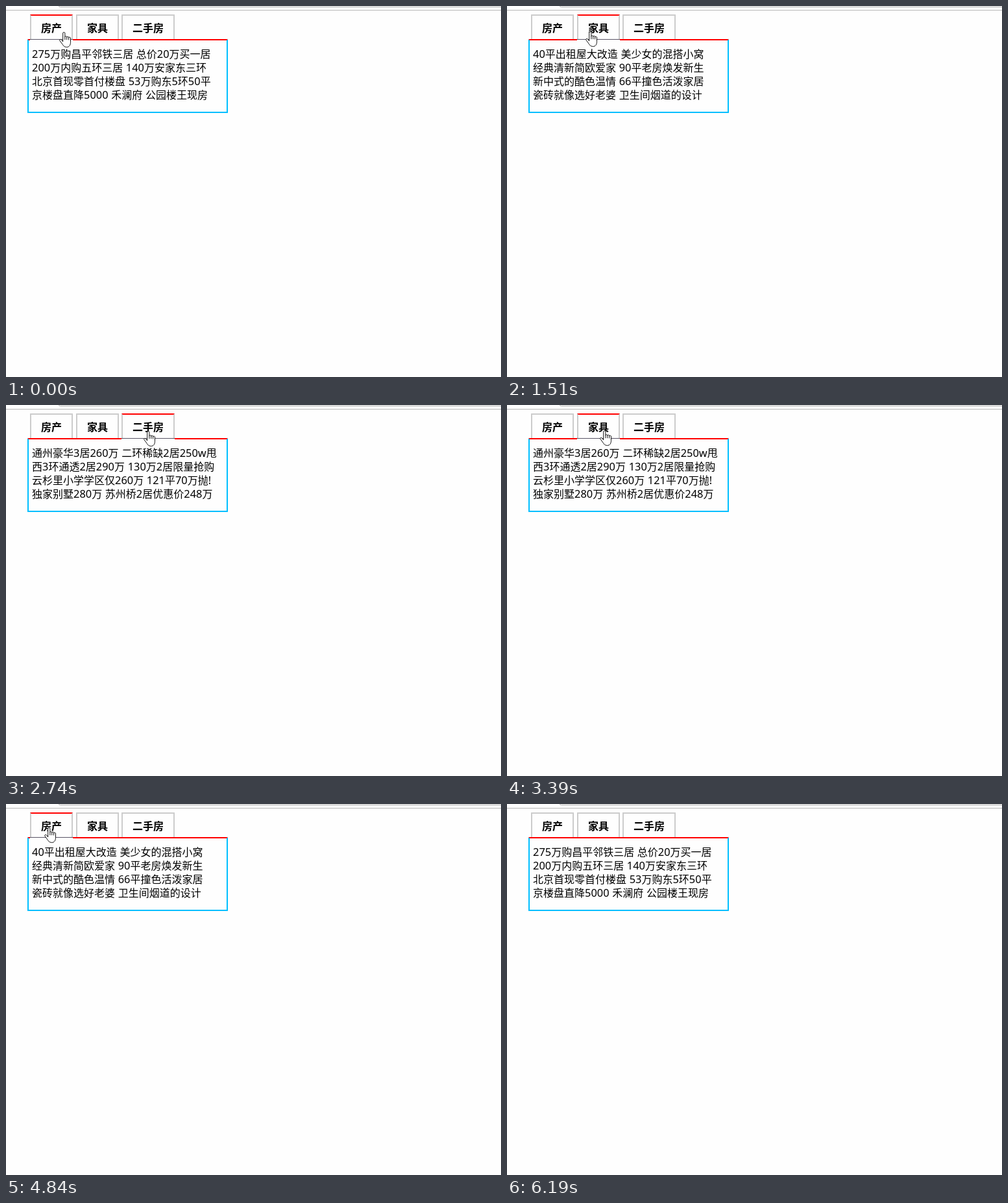
An HTML page that plays this animation: 763 px wide and 572 px high, repeating every 6740 ms.

```html
<!DOCTYPE html>
<html lang="zh-CN">
<head>
<meta charset="utf-8">
<title>Tabs</title>
<style>
html, body { margin: 0; width: 100%; height: 100%; overflow: hidden; background: #fefefe; }
svg { display: block; width: 763px; height: 572px; }
text { font: 16px "Noto Sans CJK SC", "Noto Sans CJK", sans-serif; white-space: pre; word-spacing: .4px; fill: #000; }
tspan.latin { font-family: "Noto Sans", "Open Sans", sans-serif; font-size: 16.4px; }
.tab text { font-weight: 700; }

.timed { opacity: 0; animation: 6740ms step-end infinite; }
#hot0 { animation-name: hot0; }
#hot1 { animation-name: hot1; }
#hot2 { animation-name: hot2; }
#list0 { animation-name: list0; }
#list1 { animation-name: list1; }
#list2 { animation-name: list2; }
#hand { animation-name: hand; }
#beam { animation-name: beam; }
#arrow { animation-name: arrow; }

@keyframes hot0 {
  0%, 70.03%, 100% { opacity: 1; }
  14.39%, 84.12% { opacity: 0; }
}
@keyframes hot1 {
  0%, 32.64%, 66.02%, 100% { opacity: 0; }
  14.39%, 48.36% { opacity: 1; }
}
@keyframes hot2 {
  0%, 48.36%, 100% { opacity: 0; }
  32.64% { opacity: 1; }
}
@keyframes list0 {
  0%, 79.82%, 100% { opacity: 1; }
  22.4% { opacity: 0; }
}
@keyframes list1 {
  0%, 40.65%, 79.82%, 100% { opacity: 0; }
  22.4%, 58.16% { opacity: 1; }
}
@keyframes list2 {
  0%, 58.16%, 100% { opacity: 0; }
  40.65% { opacity: 1; }
}
@keyframes hand {
  0%, 100% { opacity: 1; transform: translate(82px, 40px); }
  11.86% { opacity: 1; transform: translate(85px, 40px); }
  14.39% { opacity: 1; transform: translate(121px, 39px); }
  30.56% { opacity: 1; transform: translate(171px, 32px); }
  32.64% { opacity: 1; transform: translate(200px, 36px); }
  34.56% { opacity: 1; transform: translate(212px, 40px); }
  46.43% { opacity: 1; transform: translate(194px, 39px); }
  48.36% { opacity: 1; transform: translate(160px, 39px); }
  50.29% { opacity: 1; transform: translate(143px, 39px); }
  64.09% { opacity: 1; transform: translate(125px, 38px); }
  66.02% { opacity: 0; transform: translate(105px, 36px); }
  70.03% { opacity: 1; transform: translate(76px, 36px); }
  71.81% { opacity: 1; transform: translate(59px, 36px); }
  81.75% { opacity: 1; transform: translate(64px, 39px); }
  84.12% { opacity: 0; transform: translate(64px, 39px); }
}
@keyframes beam {
  0%, 70.03%, 100% { opacity: 0; transform: translate(105px, 34px); }
  66.02% { opacity: 1; transform: translate(105px, 34px); }
}
@keyframes arrow {
  0%, 91.83%, 100% { opacity: 0; transform: translate(748px, 548px); }
  84.12% { opacity: 1; transform: translate(122px, 84px); }
  86.05% { opacity: 1; transform: translate(300px, 222px); }
  87.98% { opacity: 1; transform: translate(528px, 394px); }
  89.91% { opacity: 1; transform: translate(748px, 548px); }
}
</style>
</head>
<body>
<svg id="stage" viewBox="0 0 763 572" xmlns="http://www.w3.org/2000/svg">
  <path d="M81.5 0Q81.5 1.5 83.5 1.5H763" fill="none" stroke="#aaa"/>
  <rect y="6" width="763" height="1" fill="#b8b8b8"/>

  <path d="M34 52V164H341V52" fill="none" stroke="#00bfff" stroke-width="2"/>
  <path d="M33 51H342L340 53H35Z" fill="#f00"/>
  <g id="tabs"></g>
  <g id="lists"></g>

  <g id="beam" class="timed">
    <path d="M.5 .5H2.5L3.5 1.5L4.5 .5H6.5M3.5 1.5V14.5M.5 15.5H2.5L3.5 14.5L4.5 15.5H6.5" fill="none" stroke="#000"/>
  </g>
  <g id="arrow" class="timed">
    <path d="M.5 .5V16.5L4.2 13L6.7 18.6L9 17.6L6.6 12.1H11.6Z" fill="#fff" stroke="#000"/>
  </g>
  <g id="hand" class="timed" stroke="#111" stroke-linecap="round" stroke-linejoin="round">
    <path fill="#fff" d="M5.7 14.5V2.1a1.6 1.6 0 0 1 3.2 0V7.6a1.5 1.5 0 0 1 2.9 .6a1.5 1.5 0 0 1 2.9 .9a1.4 1.4 0 0 1 2.8 1V15.5C17.5 20.5 15.4 23.4 11.6 23.4C7.8 23.4 6.7 21.5 5.3 19.4L.9 13.4C.1 12 1.6 10.6 3.1 11.7Z"/>
    <path fill="none" d="M8.9 7.6V11.8M11.8 8.4V11.8M14.7 9.4V12"/>
  </g>
</svg>
<script>
const NS = "http://www.w3.org/2000/svg";

function add(parent, tag, attrs = {}) {
  const el = document.createElementNS(NS, tag);
  for (const key in attrs) el.setAttribute(key, attrs[key]);
  return parent.appendChild(el);
}

// Latin runs get their own face beside the Chinese glyphs.
function addText(parent, x, y, str) {
  const line = add(parent, "text", { x, y });
  for (const run of str.match(/[\x20-\x7e]+|[^\x20-\x7e]+/g)) {
    const span = add(line, "tspan");
    if (run.charCodeAt(0) < 127) span.setAttribute("class", "latin");
    span.textContent = run;
  }
}

const tabs = [["房产", 37, 66], ["家具", 108, 66], ["二手房", 178, 82]];
const lists = [
  ["275万购昌平邻铁三居 总价20万买一居", "200万内购五环三居 140万安家东三环",
   "北京首现零首付楼盘 53万购东5环50平", "京楼盘直降5000 禾澜府 公园楼王现房"],
  ["40平出租屋大改造 美少女的混搭小窝", "经典清新简欧爱家 90平老房焕发新生",
   "新中式的酷色温情 66平撞色活泼家居", "瓷砖就像选好老婆 卫生间烟道的设计"],
  ["通州豪华3居260万 二环稀缺2居250w甩", "西3环通透2居290万 130万2居限量抢购",
   "云杉里小学学区仅260万 121平70万抛!", "独家别墅280万 苏州桥2居优惠价248万"]
];

tabs.forEach(([label, x, w], i) => {
  const tab = add(document.getElementById("tabs"), "g", { class: "tab" });
  add(tab, "path", {
    d: `M${x + 1} 51V14H${x + w - 1}V51`, fill: "none", stroke: "#ccc", "stroke-width": 2
  });
  const hot = add(tab, "g", { id: "hot" + i, class: "timed" });
  add(hot, "path", { d: `M${x} 13H${x + w}L${x + w - 2} 15H${x + 2}Z`, fill: "#f00" });
  add(hot, "rect", { x, y: 51, width: w, height: 2, fill: "#fefefe" });
  add(hot, "rect", { x, y: 51, width: w, height: 1, fill: "#5a5566" });
  addText(tab, x + 17, 40, label);
});

lists.forEach((lines, i) => {
  const list = add(document.getElementById("lists"), "g", { id: "list" + i, class: "timed" });
  lines.forEach((str, n) => addText(list, 40, 80 + 21 * n, str));
});
</script>
</body>
</html>
```
